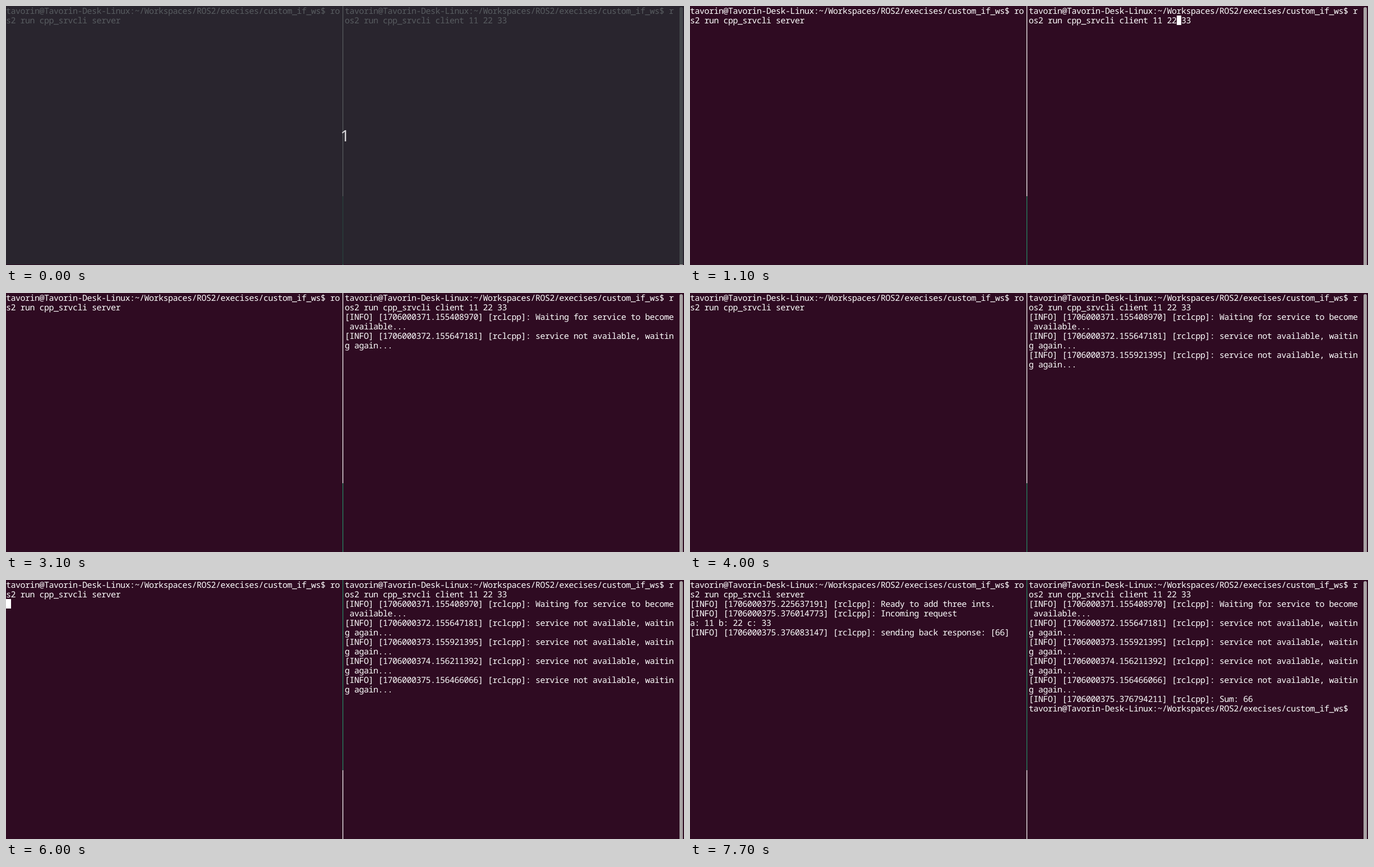
Write an HTML page that moves like this. It is 1209 by 463 pixels and loops after 8000 ms.

```html
<!DOCTYPE html>
<html lang="en">
<head>
<meta charset="utf-8">
<title>Service and client terminals</title>
<style>
  html, body { margin: 0; width: 100%; height: 100%; overflow: hidden; }
  body { position: relative; background: #2f0b22; }
  body > * { position: absolute; margin: 0; }
  pre, #cursor {
    font: 15px/17px "Noto Sans Mono", monospace;
    text-rendering: geometricPrecision;
    font-variant-ligatures: none;
    white-space: pre;
    color: #fff;
    padding-top: 1px;
  }
  pre { top: 0; }
  #left { left: 0; }
  #right { left: 604px; }
  #cursor { width: 8.5px; height: 16px; background: #fff; color: #2f0b22; overflow: hidden; }
  .rule { left: 600px; width: 2px; }
  .white { background: linear-gradient(90deg, #f0ecee 50%, #f0ecee55 50%); }
  .green { background: linear-gradient(90deg, #26805e 50%, #26805e55 50%); }
  #upper { top: 0; height: 340px; }
  #lower { top: 340px; height: 123px; }
  #bar { left: 1201px; top: 2px; width: 6px; height: 470px; border-radius: 3px; background: #a9a3a5; }
  #shade { left: 0; top: 0; width: 1209px; height: 462px; background: rgba(40, 46, 51, .78); }
  #count {
    left: 0; top: 0; width: 1209px; text-align: center; color: #dad9dc;
    font: 28px/463px "Noto Sans", sans-serif;
  }
</style>
</head>
<body>
<pre id="left"></pre>
<pre id="right"></pre>
<div id="cursor"></div>
<div id="upper" class="rule"></div>
<div id="lower" class="rule"></div>
<div id="bar"></div>
<div id="shade"></div>
<div id="count">1</div>
<script>
const LOOP = 8000, CELL = 8.5, ROW = 17, FOCUS_LEFT = 5000, DIM_END = 100;
const $ = id => document.getElementById(id);
const prompt = 'tavorin@Tavorin-Desk-Linux:~/Workspaces/ROS2/execises/custom_if_ws$ ';
const info = (stamp, text) => `[INFO] [1706000${stamp}] [rclcpp]: ${text}`;
const retry = stamp => info(stamp, 'service not available, waiting again...');

// Each log entry: time it appears, text.
const panes = {
  left: { x: 0, cols: 70, log: [
    [0, prompt + 'ros2 run cpp_srvcli server'],
    [6100, info('375.225637191', 'Ready to add three ints.')],
    [6200, info('375.376014773', 'Incoming request')],
    [6200, 'a: 11 b: 22 c: 33'],
    [6200, info('375.376083147', 'sending back response: [66]')]
  ] },
  right: { x: 604, cols: 69, log: [
    [0, prompt + 'ros2 run cpp_srvcli client 11 22 33'],
    [2100, info('371.155408970', 'Waiting for service to become available...')],
    [3100, retry('372.155647181')],
    [4000, retry('373.155921395')],
    [5000, retry('374.156211392')],
    [6000, retry('375.156466066')],
    [6200, info('375.376794211', 'Sum: 66')],
    [6300, prompt]
  ] }
};

// Cursor steps: time, column, row; no column means hidden.
const steps = [
  [0], [400, 27, 1], [500, 28, 1], [700, 29, 1], [900, 30, 1],
  [1100, 31, 1], [1200, 32, 1], [1500, 33, 1], [1600, 34, 1],
  [2000, 0, 2], [2100, 0, 4], [2500], [3200, 0, 6], [3700], [4100, 0, 8],
  [5000, 24, 1], [5500], [6000, 0, 2], [6100, 0, 3], [6200, 0, 6],
  [6500], [7100, 0, 6], [7700]
];

const wrap = (text, cols) => text.match(new RegExp(`.{1,${cols}}`, 'g'));
const rowsAt = ({ log, cols }, t) =>
  log.filter(([at]) => at <= t).flatMap(([, text]) => wrap(text, cols));

// Snap the font's advance to the terminal grid.
function fitGrid() {
  const pre = $('left');
  pre.textContent = '0'.repeat(100);
  const advance = pre.getBoundingClientRect().width / 100;
  for (const id of ['left', 'right']) $(id).style.letterSpacing = `${CELL - advance}px`;
}

function draw(t) {
  const rows = {};
  for (const id in panes) {
    rows[id] = rowsAt(panes[id], t);
    const text = rows[id].join('\n');
    if ($(id).textContent !== text) $(id).textContent = text;
  }

  const leftFocus = t >= FOCUS_LEFT;
  const active = leftFocus ? 'left' : 'right';
  const [, col, row] = steps.findLast(([at]) => at <= t);
  const cursor = $('cursor');
  cursor.hidden = col === undefined;
  if (!cursor.hidden) {
    cursor.style.left = `${panes[active].x + col * CELL}px`;
    cursor.style.top = `${row * ROW}px`;
    cursor.textContent = (rows[active][row] || '')[col] || '';
  }

  $('upper').className = leftFocus ? 'rule green' : 'rule white';
  $('lower').className = leftFocus ? 'rule white' : 'rule green';
  $('shade').hidden = $('count').hidden = t >= DIM_END;
}

fitGrid();
const start = performance.now();
function tick() {
  draw((performance.now() - start) % LOOP);
  requestAnimationFrame(tick);
}
tick();
</script>
</body>
</html>
```
